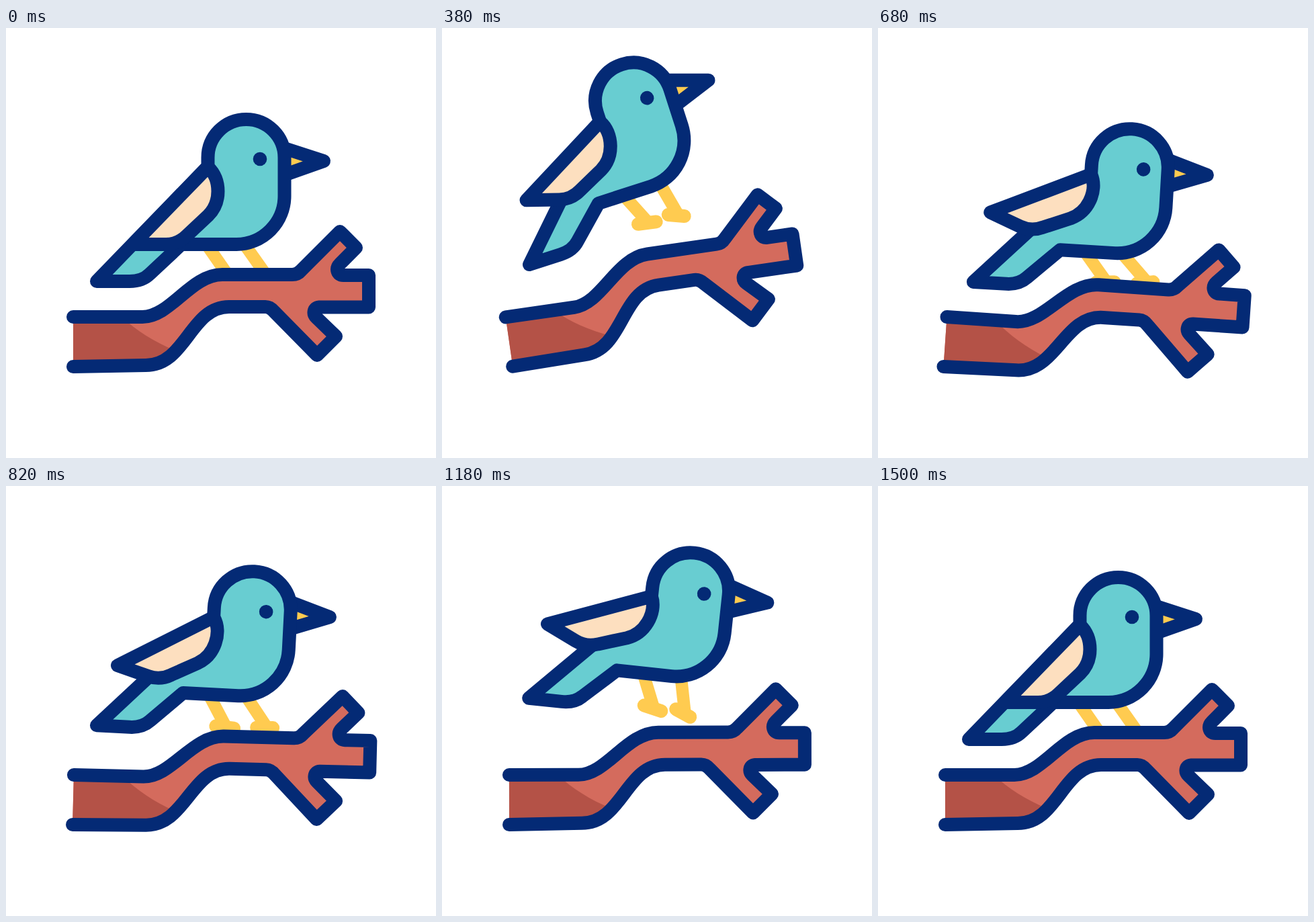
Animation, 640 px wide and 640 px high, one loop 2400 ms. Source, as an HTML page:

```html
<!DOCTYPE html>
<html lang="en">
<head>
<meta charset="utf-8">
<title>Bird on a branch</title>
<style>
  html, body { margin: 0; height: 100%; overflow: hidden; background: #fff; }
  svg { display: block; width: 100vw; height: 100vh; }
  .line { stroke: #042a75; stroke-width: 20; stroke-linecap: round; stroke-linejoin: round; }
  .leg { fill: none; stroke: #ffcb50; stroke-width: 18.5; }
  .foot { stroke-width: 20; stroke-linecap: round; }
</style>
</head>
<body>
<svg viewBox="0 0 640 640">
  <defs>
    <path id="bough" d="M100 430H203C245 430 275 367 322 367H426Q434 367 439 361L497 303L521 327L497 351C490 358 493 368 502 368H540V415.500H466C458 416 456 425 462 431L491 459L463 487L399 422Q393 415 386 415H332C274 415 268 502 208 502L100 504"/>
  </defs>
  <g class="bird">
    <g id="backLeg" class="leg">
      <path d="M297 320L329 366"/>
      <path class="foot" d="M315 368H342"/>
    </g>
    <g id="frontLeg" class="leg">
      <path d="M353.500 320L386 366"/>
      <path class="foot" d="M372 368H396"/>
    </g>
  </g>
  <g id="branch">
    <use href="#bough" fill="#d46b5d"/>
    <path fill="#b45247" d="M100 430H172C194 450 220 467 252 480L208 502L100 504Z"/>
    <use href="#bough" class="line" fill="none"/>
  </g>
  <g class="bird">
    <path class="line" fill="#ffcb50" d="M405 176L473 198L405 222Z"/>
    <path class="line" fill="#68cdd1" d="M135 377L300.500 206V193A57 57 0 0 1 414.500 193V250A72 72 0 0 1 343 322H261L214 366Q203 377 184 377Z"/>
    <circle cx="378" cy="195" r="10.300" fill="#042a75"/>
    <path id="wing" class="line" fill="#fddfbf" d="M300.500 207C311 216 315.500 230 315.500 243C315.500 258 310 270 301 279L269 309C260 318 250 322 238 322H189Z"/>
  </g>
</svg>
<script>
const LOOP = 2400, STEP = 20;
const birdParts = document.querySelectorAll('.bird');

const smooth = p => p * p * (3 - 2 * p);

// Eases from 0 up to 1 at the peak and back to 0 at the end.
function bump(time, start, peak, end) {
  if (time <= start || time >= end) return 0;
  return smooth(time < peak ? (time - start) / (peak - start) : (end - time) / (end - peak));
}

function turn(id, angle, x, y) {
  document.getElementById(id).setAttribute('transform', `rotate(${angle} ${x} ${y})`);
}

function draw(time) {
  const pulse = (...span) => bump(time, ...span);
  const leap = pulse(0, 370, 690);
  const landing = pulse(370, 690, 980);
  const rebound = pulse(690, 980, 1210);
  const hop = pulse(690, 1060, 1500);
  const flare = pulse(690, 1190, 1500);

  // The whole bird tilts around the tip of its tail.
  const x = 135 - 5 * leap + 7 * landing - 21 * hop + 11.4 * flare;
  const y = 377 - 25 * leap + landing - 75 * hop;
  const tilt = -18 * leap + 3.4 * landing + 6.1 * flare;
  const pose = `translate(${x} ${y}) rotate(${tilt}) translate(-135 -377)`;
  birdParts.forEach(part => part.setAttribute('transform', pose));

  const flaps = 28 * pulse(0, 260, 540) + 25 * pulse(540, 720, 970) + 25 * pulse(880, 1190, 1500);
  turn('wing', flaps, 300.5, 207);
  turn('backLeg', 15 * pulse(0, 210, 690) - 4 * landing + 17 * pulse(690, 1000, 1500), 303, 329);
  turn('frontLeg', 23 * pulse(100, 380, 690) - 9 * landing + 23 * flare, 358, 326);

  // Each swing of the branch is about half the one before.
  turn('branch', 8.2 * (-leap + 0.48 * landing - 0.24 * rebound), 100, 467);
}

function tick() {
  const time = performance.now() % LOOP;
  draw(time - time % STEP);
  requestAnimationFrame(tick);
}
tick();
</script>
</body>
</html>
```
